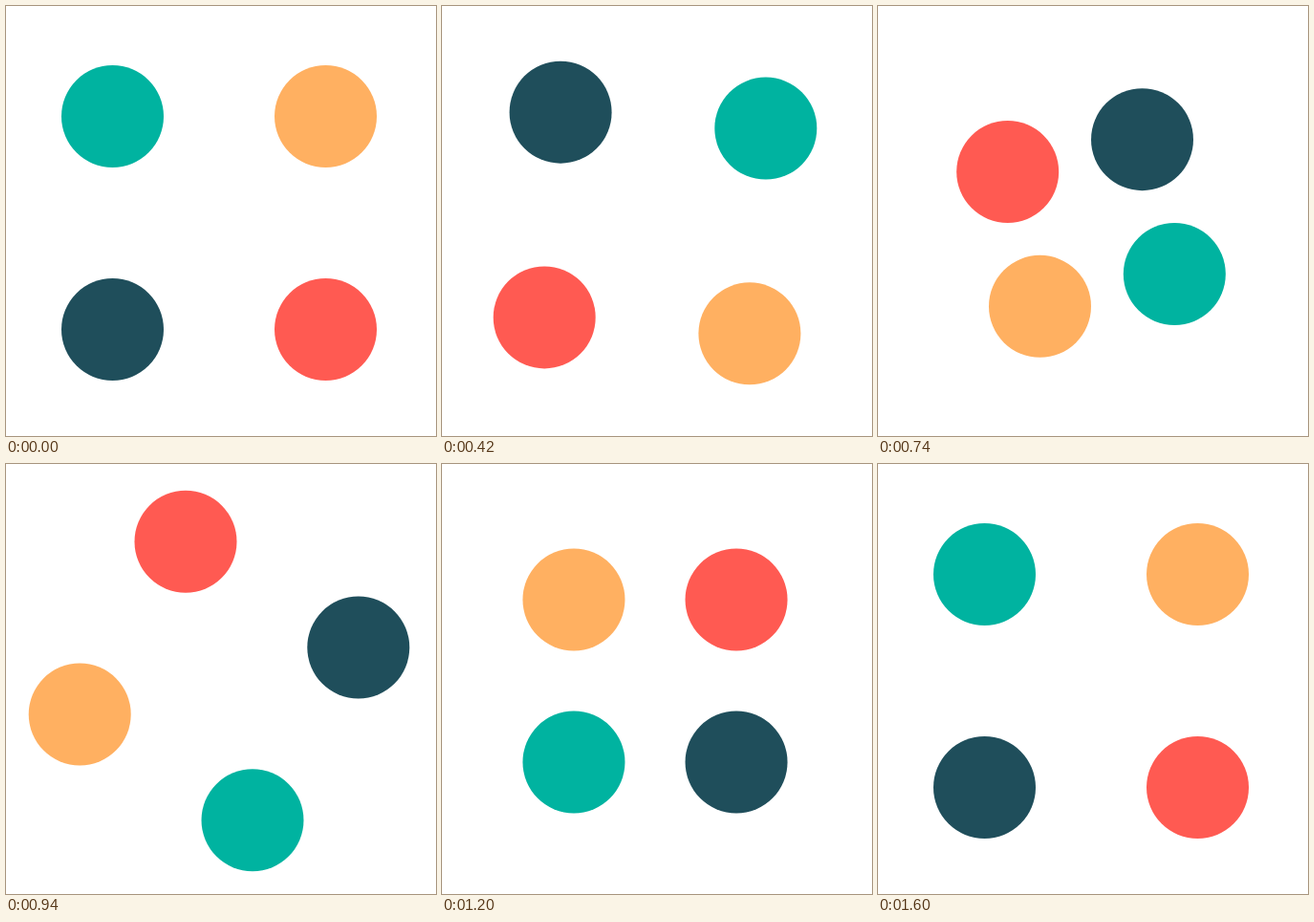
Write an HTML page that moves like this. It is 450x450 px and loops after 1620 ms.

```html
<!DOCTYPE html>
<html lang="en">
<head>
<meta charset="utf-8">
<title>Four dots</title>
<style>
  html, body { margin: 0; width: 100%; height: 100%; overflow: hidden; background: #fff; }
  svg { display: block; width: 450px; height: 450px; }
</style>
</head>
<body>
<svg viewBox="0 0 450 450">
  <circle r="53.5" fill="#00b3a0"/>
  <circle r="53.5" fill="#ffb061"/>
  <circle r="53.5" fill="#ff5a52"/>
  <circle r="53.5" fill="#1f4e5b"/>
</svg>
<script>
  const LOOP = 1620, TURN = 1600, PULSE = 540, SETTLE = 520, TICK = 20;
  const CX = 223, CY = 227, REACH = 157.7;
  const dots = document.querySelectorAll('circle');

  // Accelerate inwards, then decelerate back out; settled for the last tick.
  function radius(t) {
    const p = t % PULSE;
    const rest = Math.max(0, SETTLE - p);
    return REACH - Math.min(0.0026 * p * p, 0.00054 * rest * rest);
  }

  function draw(now) {
    const t = Math.floor(((now + 0.5) % LOOP) / TICK) * TICK;
    const r = radius(t);
    const turn = t / TURN * 2 * Math.PI - 0.75 * Math.PI;
    dots.forEach((dot, i) => {
      const a = turn + i * Math.PI / 2;
      dot.setAttribute('cx', CX + r * Math.cos(a));
      dot.setAttribute('cy', CY + r * Math.sin(a));
    });
  }

  function loop() {
    draw(performance.now());
    requestAnimationFrame(loop);
  }
  loop();
</script>
</body>
</html>
```
